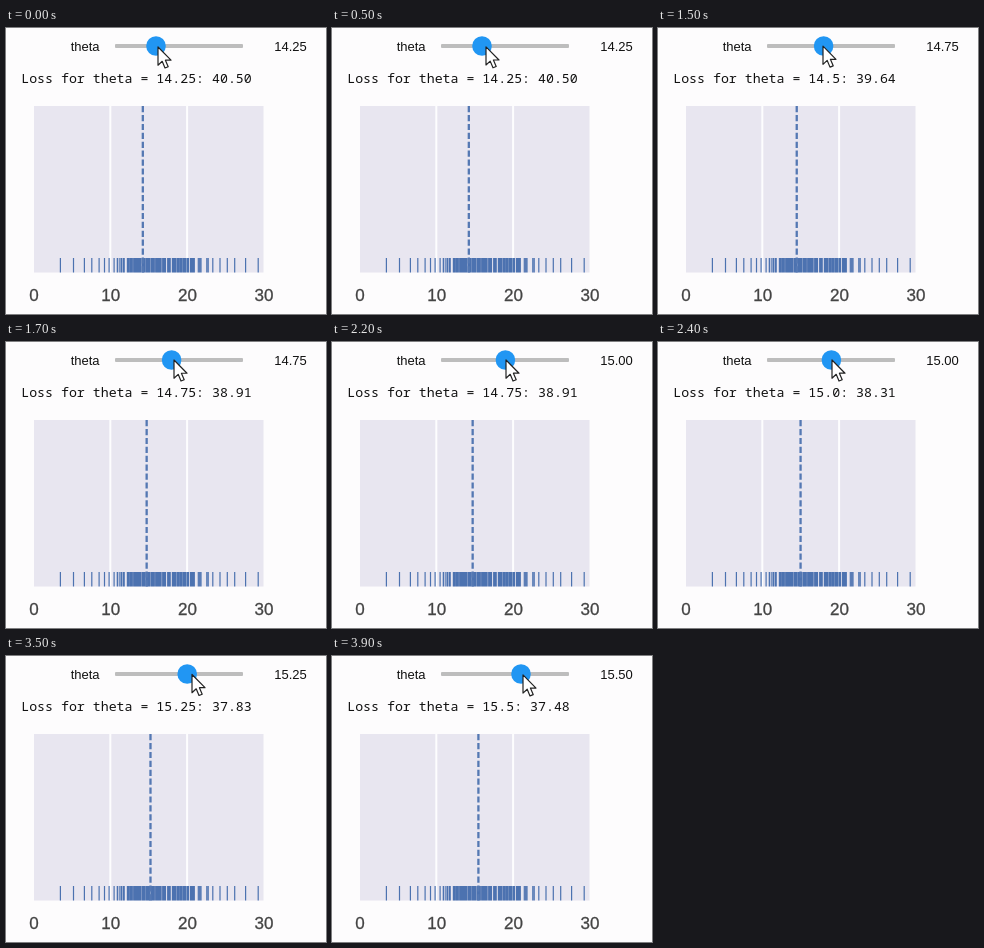
Animation, 320 px wide and 286 px high, one loop 4 s. Source, as an HTML page:

```html
<!DOCTYPE html>
<html lang="en">
<head>
<meta charset="utf-8">
<title>Loss slider</title>
<style>
  html, body { margin: 0; width: 100%; height: 100%; overflow: hidden; background: #fdfcfd; }
  svg { display: block; width: 320px; height: 286px; }
  text { font-family: "Liberation Sans", Arial, sans-serif; font-size: 13px; fill: #111; }
  #loss { font-family: "Noto Sans Mono", "DejaVu Sans Mono", monospace; font-size: 13.25px; white-space: pre; }
  #axis text { font-size: 17px; fill: #444; stroke: #444; stroke-width: .3px; text-anchor: middle; }
</style>
</head>
<body>
<svg viewBox="0 0 320 286">
  <text x="64.7" y="23">theta</text>
  <rect x="109" y="16" width="128" height="4" rx="1" fill="#bdbdbd"/>
  <circle id="knob" cy="18" r="9.8" fill="#2196f3"/>
  <text id="readout" x="268.3" y="23"></text>
  <text id="loss" x="15.2" y="55"></text>

  <rect x="28" y="78" width="229.5" height="166.5" fill="#e8e6f0"/>
  <path d="M104.3 78V244.5M181.1 78V244.5" stroke="#fdfdfe" stroke-width="2"/>
  <path id="rug" stroke="#4c72b0" stroke-width="1.2"/>
  <path id="marker" d="M0 244.5V78" stroke="#5478b3" stroke-width="2.3" stroke-dasharray="6.2 2.7"/>
  <g id="axis"></g>

  <path id="cursor" d="M0 0V18.2L4.2 14.3L7 21L10.2 19.7L7.4 13.2H13Z"
        fill="#fff" stroke="#222" stroke-width="1.2" stroke-linejoin="round"/>
</svg>
<script>
const $ = id => document.getElementById(id);
const LOOP = 4000, TICK = 100, LAG = 200, MOVE = 400;
const START = 14.25, STEP = 0.25, STEP_PX = 7.8;

// the pointer's drags: start time and resting x
const HOME_X = 152;
const drags = [[300, 156], [1200, 168], [1800, 174], [2400, 181], [3300, 191]];

const clamp = v => Math.min(1, Math.max(0, v));
const plotX = value => 27.6 + value * 7.665;
const pointerX = t => drags.reduce((x, [start, end]) => x + (end - x) * clamp((t - start) / MOVE), HOME_X);
const pointerY = x => 18 + ((x - 172) / 20) ** 2;
const stepAt = t => Math.round((pointerX(t) - HOME_X + 0.3) / STEP_PX);
const thetaAt = t => START + STEP * stepAt(t);
const meanSquaredLoss = theta => (theta - 16.083) ** 2 + 37.136;
const label = v => Number.isInteger(v) ? v.toFixed(1) : String(v);

function seededRandom(seed) {
  return () => (seed = seed * 16807 % 2147483647) / 2147483647;
}

function drawAxis() {
  for (let value = 0; value <= 30; value += 10) {
    $("axis").innerHTML += `<text x="${plotX(value) + 0.5}" y="273">${value}</text>`;
  }
}

// Samples are even in the core, spread out in the tails.
function drawRug() {
  const random = seededRandom(29), count = 135;
  let path = "";
  for (let i = 0; i < count; i++) {
    const u = 2 * i / (count - 1) - 1;
    const jitter = (random() - 0.5) * 0.5 * (1 - u ** 20);
    path += `M${plotX(16.4 + 5 * u + 7.9 * u ** 15 + jitter).toFixed(1)} 230v14.5`;
  }
  $("rug").setAttribute("d", path);
}

function draw(now) {
  const t = Math.floor(now % LOOP / TICK) * TICK;
  const x = pointerX(t), theta = thetaAt(t - LAG);
  $("knob").setAttribute("cx", 150 + STEP_PX * stepAt(t));
  $("readout").textContent = thetaAt(t).toFixed(2);
  $("loss").textContent = `Loss for theta = ${label(theta)}: ${meanSquaredLoss(theta).toFixed(2)}`;
  $("marker").setAttribute("transform", `translate(${plotX(theta)} 0)`);
  $("cursor").setAttribute("transform", `translate(${x} ${pointerY(x)})`);
}

drawAxis();
drawRug();
draw(0);
const begin = performance.now();
requestAnimationFrame(function frame() {
  draw(performance.now() - begin);
  requestAnimationFrame(frame);
});
</script>
</body>
</html>
```
